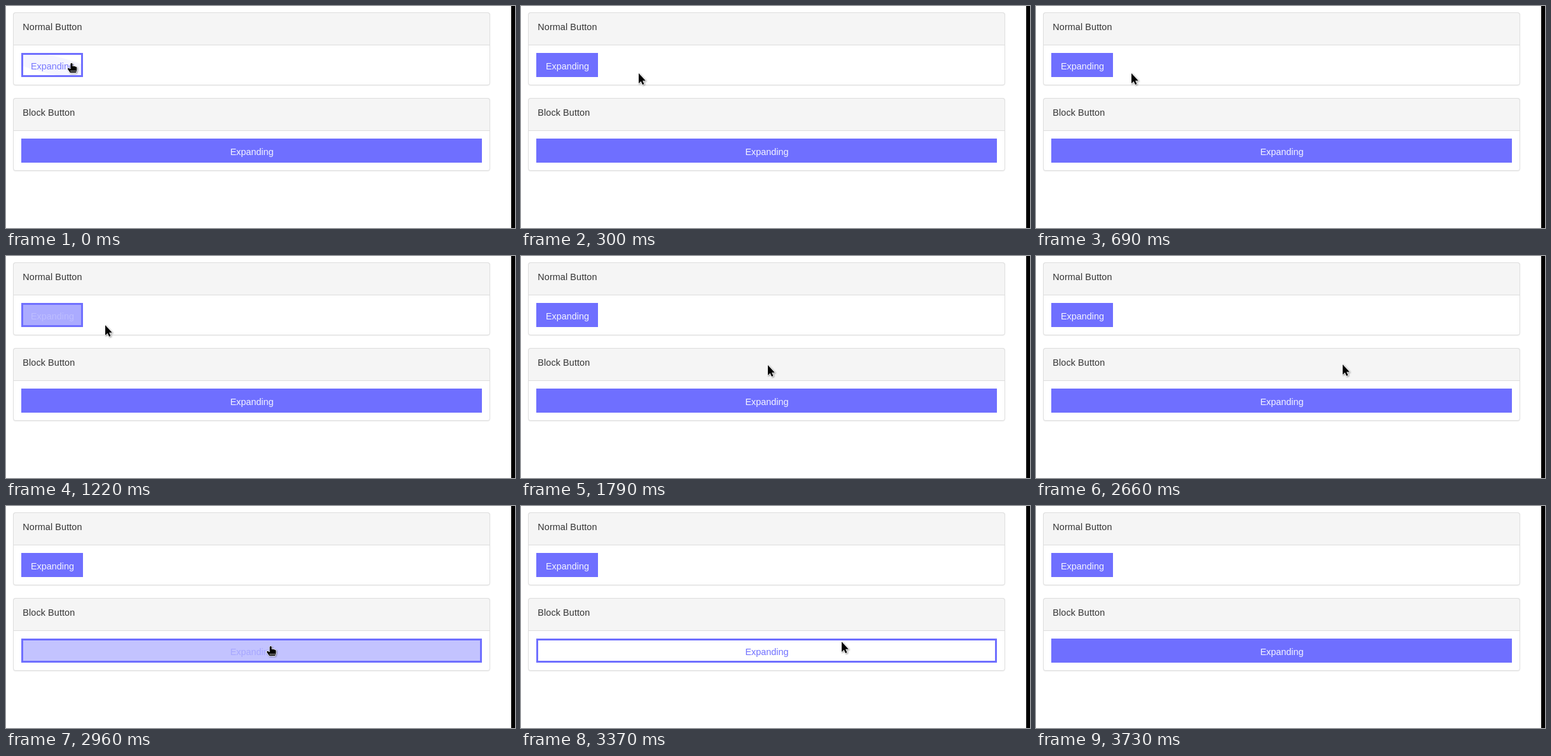
Write an HTML page that moves like this. It is 800 by 350 pixels and loops after 4.72 s.

```html
<!DOCTYPE html>
<html lang="en">
<head>
<meta charset="utf-8">
<title>Expanding buttons</title>
<style>
  html, body { margin: 0; width: 100%; height: 100%; overflow: hidden; background: #fff; }
  svg { display: block; width: 800px; height: 350px; }
  text { font: 14.4px "Liberation Sans", Arial, sans-serif; }
  .title { fill: #333; letter-spacing: .1px; }
  .panel { fill: #fff; stroke: #ddd; }
  .shadow { opacity: .05; }
  .head { fill: #f5f5f5; stroke: #ddd; }
  .frame { fill: #fff; stroke: #6f6fff; stroke-width: 3; }
  .fill { fill: #6f6fff; }
  .label { text-anchor: middle; }
  .pointer { stroke: #fff; stroke-linejoin: round; paint-order: stroke; filter: drop-shadow(1px 1px .8px #0006); }
</style>
</head>
<body>
<svg viewBox="0 0 800 350">
  <g id="panels"></g>
  <rect x="794" width="6" height="350"/>
  <g id="cursor">
    <path id="arrow" class="pointer" stroke-width="1.6"
      d="M0 0V16L3.6 12.7L6 18L8.5 16.9L6.1 11.8H10.8Z"/>
    <g id="hand">
      <path class="pointer" stroke-width="1.4"
        d="M-1.5 1Q0 -.8 1.5 1V5Q4 4 8.3 6.5V10.5L7 15H-2.2L-6 9.5Q-6.5 7.6 -4.6 7.7L-1.5 9.5Z"/>
      <path stroke="#fff" stroke-width=".8" d="M-2 12.7H7"/>
    </g>
  </g>
</svg>
<script>
const LOOP = 4720, FADE = 120, STEP = 40, TICK = 10, RIGHT_EDGE = 764;
const byId = id => document.getElementById(id);
const mix = (a, b, p) => a + (b - a) * p;
const clamp = v => Math.max(0, Math.min(1, v));

const buttons = [
  { title: "Normal Button", top: 10, width: 97, startLevel: .07 },
  { title: "Block Button", top: 145, width: 724, startLevel: 1 }
];

// Straight cursor moves; each begins where the one before ended
const home = { x: 103, y: 90 };
const moves = [
  { start: 150, end: 340, x: 200, y: 109 },
  { start: 490, end: 730, x: 150, y: 106 },
  { start: 730, end: 850, x: 100, y: 95 },
  { start: 1160, end: 1450, x: 304, y: 145 },
  { start: 1590, end: 1830, x: 388, y: 172 },
  { start: 1830, end: 2030, x: 470, y: 236 },
  { start: 2350, end: 2510, x: 482, y: 171 },
  { start: 2700, end: 3060, x: 397, y: 235 },
  { start: 3290, end: 3730, x: 790, y: 158 }
];

byId("panels").innerHTML = buttons.map(({ title, top, width }, i) => {
  const middle = 24 + width / 2;
  return `<rect class="shadow" x="11" y="${top + 1}" width="750" height="115" rx="4"/>
    <rect class="panel" x="11.5" y="${top + .5}" width="749" height="114" rx="3.5"/>
    <path class="head" d="M11.5 ${top + 51.5}v-47.5q0 -3.5 3.5 -3.5h742q3.5 0 3.5 3.5v47.5z"/>
    <text class="title" x="26.3" y="${top + 28}">${title}</text>
    <rect class="frame" x="25.5" y="${top + 65.5}" width="${width - 3}" height="35"/>
    <clipPath id="inside${i}"><rect x="26" y="${top + 66}" width="${width - 4}" height="34"/></clipPath>
    <g clip-path="url(#inside${i})">
      <ellipse class="fill" rx="${width * .75}" transform="translate(${middle} ${top + 83}) rotate(12)"/>
    </g>
    <text class="label" x="${middle + .4}" y="${top + 90}">Expanding</text>`;
}).join("");
const fills = document.querySelectorAll(".fill");
const labels = document.querySelectorAll(".label");

function cursorAt(t) {
  const i = moves.findLastIndex(move => move.start <= t);
  if (i < 0) return { ...home, goal: home };
  const from = moves[i - 1] || home, goal = moves[i];
  const steps = Math.floor((t - goal.start) / STEP) + 1;
  const p = clamp(steps * STEP / (goal.end - goal.start));
  return { x: Math.round(mix(from.x, goal.x, p)), y: Math.round(mix(from.y, goal.y, p)), goal };
}

const isOver = ({ top, width }, { x, y }) =>
  x >= 24 && x < 24 + width && y >= top + 64 && y < top + 102;

// The fill drains while the cursor is over the button and returns afterwards
function fillLevel(button, t) {
  let level = button.startLevel;
  for (let time = moves[0].start; time < t; time += TICK) {
    const change = TICK / FADE;
    level = clamp(level + (isOver(button, cursorAt(time)) ? -change : change));
  }
  return level;
}

function draw(t) {
  buttons.forEach((button, i) => {
    const level = fillLevel(button, t), shade = mix(111, 245, level);
    fills[i].setAttribute("ry", button.width * mix(.12, .5, level));
    fills[i].setAttribute("opacity", level);
    labels[i].setAttribute("fill", `rgb(${shade},${shade},255)`);
  });

  const cursor = cursorAt(t);
  const pointing = buttons.some(button => isOver(button, cursor) && isOver(button, cursor.goal));
  byId("arrow").style.display = pointing ? "none" : "";
  byId("hand").style.display = pointing ? "" : "none";
  byId("cursor").style.display = cursor.x > RIGHT_EDGE ? "none" : "";
  byId("cursor").setAttribute("transform", `translate(${cursor.x} ${cursor.y})`);
}

const began = performance.now();
function tick() {
  draw((performance.now() - began) % LOOP);
  requestAnimationFrame(tick);
}
tick();
</script>
</body>
</html>
```
